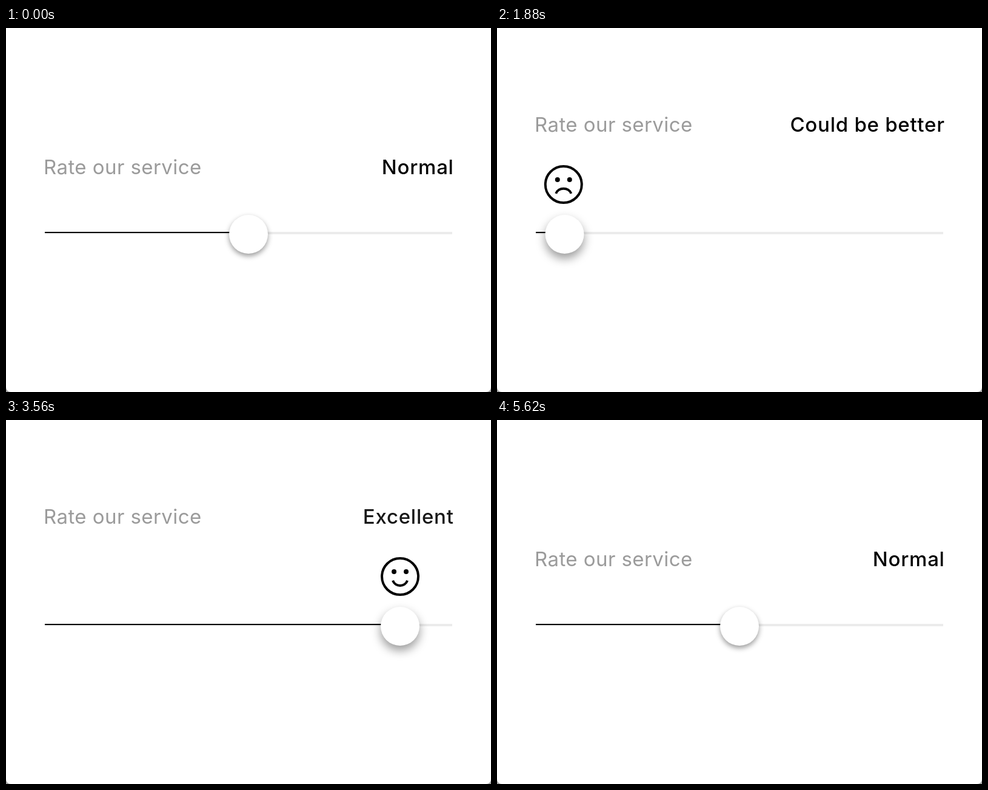
These frames come from a looping animation (800x600 px, 5680 ms). An HTML page:

```html
<!DOCTYPE html>
<html lang="en">
<head>
<meta charset="utf-8">
<title>Rating slider</title>
<style>
  html, body { margin: 0; width: 100%; height: 100%; overflow: hidden; background: #a3a3a3; }
  #card { position: absolute; width: 800px; height: 600px; background: #fff; border-radius: 0 0 8px 8px; overflow: hidden; }
  svg { position: absolute; left: 0; top: 0; }
  text { font: 500 33px Inter, Roboto, sans-serif; letter-spacing: .75px; }
  #title { font-weight: 400; letter-spacing: .43px; fill: #9b9b9b; }
  .label { text-anchor: end; }
  #knob { position: absolute; left: -32px; top: 308px; width: 64px; height: 64px; border-radius: 50%; background: #fff; }
</style>
</head>
<body>
<div id="card">
  <svg width="800" height="600">
    <g id="texts">
      <text id="title" x="62" y="241">Rate our service</text>
      <text id="low" class="label" x="738.7" y="241">Could be better</text>
      <text id="mid" class="label" x="738.7" y="241">Normal</text>
      <text id="high" class="label" x="738.7" y="241">Excellent</text>
    </g>
    <rect x="64" y="336" width="672" height="4" fill="#ebebeb"/>
    <rect id="fill" x="64" y="336" height="2"/>
    <g id="face">
      <circle r="30" fill="none" stroke="#000" stroke-width="4"/>
      <circle cx="-10" cy="-8" r="4"/>
      <circle cx="10" cy="-8" r="4"/>
      <path id="mouth" fill="none" stroke="#000" stroke-width="4"/>
    </g>
  </svg>
  <div id="knob"></div>
</div>
<script>
const LOOP = 5680, STEP = 20, CENTER = 400;
const $ = id => document.getElementById(id);
const clamp = v => Math.min(1, Math.max(0, v));
const ramp = (v, a, b) => clamp((v - a) / (b - a));
const mix = (a, b, p) => a + (b - a) * p;

// Dragged knob: [time, x]
const drag = [
  [940, 400], [1280, 305], [1560, 206], [1880, 111.5], [2000, 93], [2300, 93],
  [2880, 311], [3100, 406.5], [3460, 614], [3920, 732], [4120, 732],
  [4280, 713.5], [4680, 534], [5020, 426.5], [5240, 400]
];
const secant = i => (drag[i + 1][1] - drag[i][1]) / (drag[i + 1][0] - drag[i][0]);
const slopes = drag.map((_, i) => {
  if (i === 0 || i === drag.length - 1) return 0;
  const a = secant(i - 1), b = secant(i);
  return a * b > 0 ? 2 * a * b / (a + b) : 0;
});

// Monotone cubic through the drag points
function knobX(t) {
  const i = drag.findIndex((p, k) => k < drag.length - 1 && t >= p[0] && t < drag[k + 1][0]);
  if (i < 0) return CENTER;
  const [t0, x0] = drag[i], [t1, x1] = drag[i + 1];
  const h = t1 - t0, s = (t - t0) / h, r = 1 - s;
  return x0 * (1 + 2 * s) * r * r + x1 * s * s * (3 - 2 * s)
    + h * s * r * (slopes[i] * r - slopes[i + 1] * s);
}

// cubic-bezier(.25, .1, .25, 1)
function ease(p) {
  const curve = (a, b, u) => 3 * a * u * (1 - u) ** 2 + 3 * b * u * u * (1 - u) + u ** 3;
  let lo = 0, hi = 1;
  for (let i = 0; i < 20; i++) {
    const u = (lo + hi) / 2;
    if (curve(.25, .25, u) < p) lo = u; else hi = u;
  }
  return curve(.1, 1, lo);
}

function draw(t) {
  const press = ease(ramp(t, 420, 820)) - ease(ramp(t, 5270, 5620));
  const x = knobX(t), off = x - CENTER, dist = Math.abs(off);
  const mood = clamp(dist / 300), happy = off > 0;

  $('texts').setAttribute('transform', `translate(0 ${-70 * press})`);
  const other = ramp(dist, 160, 260);
  $('mid').setAttribute('opacity', 1 - ramp(dist, 110, 210));
  $('low').setAttribute('opacity', happy ? 0 : other);
  $('high').setAttribute('opacity', happy ? other : 0);

  $('fill').setAttribute('width', x - 64);
  $('knob').style.transform = `translateX(${x}px)`;
  $('knob').style.boxShadow =
    `0 ${mix(4, 8, press)}px ${mix(8, 16, press)}px rgba(0,0,0,.4)`;

  const faceX = happy ? x : CENTER + off * 1.006;
  $('face').setAttribute('transform', `translate(${faceX} 258)`);
  $('face').setAttribute('opacity', press);
  const w = mix(8.2, 12.7, mood);
  const end = mix(10, happy ? 6 : 15, mood);
  const bend = mix(10, happy ? 19.3 : 3.7, mood);
  $('mouth').setAttribute('d',
    `M${-w} ${end}C${-w * .7} ${bend} ${w * .7} ${bend} ${w} ${end}`);
}

const start = performance.now();
function tick() {
  const t = (performance.now() - start) % LOOP;
  draw(Math.floor(t / STEP) * STEP);
  requestAnimationFrame(tick);
}
tick();
</script>
</body>
</html>
```
